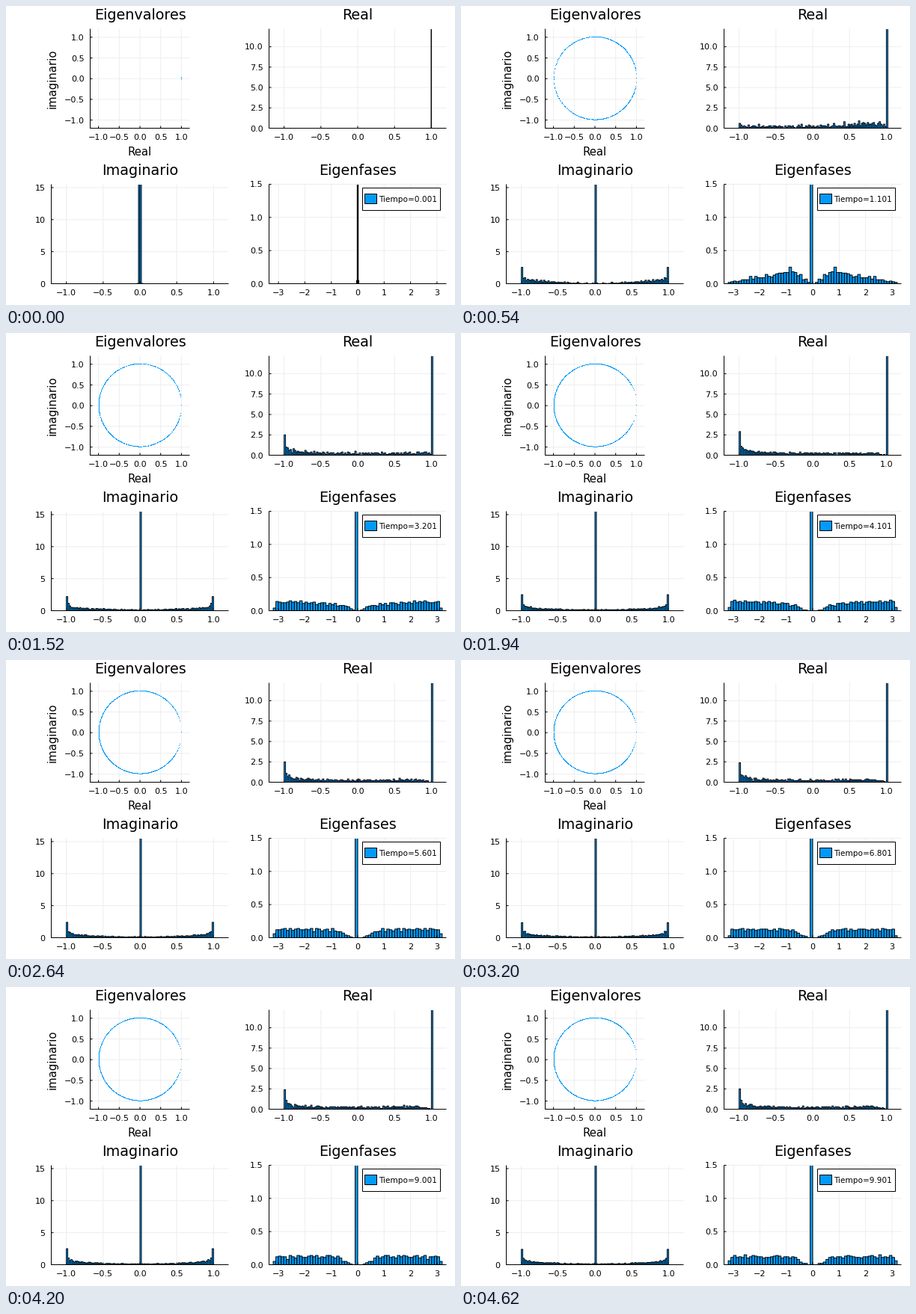
These frames come from a looping animation (600 by 400 pixels, 4640 ms). A matplotlib script:

```python
import numpy as np
import matplotlib.pyplot as plt
from matplotlib.animation import FuncAnimation
from matplotlib.collections import PolyCollection
from matplotlib.patches import Rectangle

W, H, DPI = 600, 400, 100
PX = 72 / DPI                       # points per pixel
BLUE = (0, 0.605, 0.979)
GRID = "#eeeeee"
TITLE, GUIDE, TICK, KEY = 19.1, 14.9, 11.1, 10.55   # text sizes in pixels
SIZE = 1000                         # all eigenvalues
PAIRS = 320                         # conjugate pairs away from 1
T0, DT = 0.001, 0.1

plt.rcParams["font.family"] = "DejaVu Sans"
fig = plt.figure(figsize=(W / DPI, H / DPI), dpi=DPI, facecolor="white")
ax = fig.add_axes([0, 0, 1, 1])
ax.set_xlim(0, W)
ax.set_ylim(H, 0)
ax.axis("off")


def text(x, y, s, size, ha="center", **kw):
    return ax.text(x, y, s, fontsize=size * PX, ha=ha, va="baseline", **kw)


def line(xs, ys, color="black", z=4):
    ax.plot(xs, ys, color=color, lw=PX, zorder=z, solid_capstyle="butt",
            snap=False)


def box(x, y, w, h, fill, z):
    ax.add_patch(Rectangle((x, y), w, h, fc=fill, ec="black", lw=PX,
                           zorder=z, snap=False))


class Panel:
    """Axes box in pixels, with linear scales anchored at the data origin."""

    def __init__(self, title, frame, origin, scale, xticks, yticks, xfmt, yfmt):
        self.left, self.top, self.right, self.bottom = frame
        self.x0, self.y0 = origin
        self.sx, self.sy = scale
        for v in xticks:
            x = self.x(v)
            line([x, x], [self.top, self.bottom], GRID, 0)
            line([x, x], [self.bottom, self.bottom - 3])
            text(x, self.bottom + 15.3, self.label(v, xfmt), TICK)
        for v in yticks:
            y = self.y(v)
            line([self.left, self.right], [y, y], GRID, 0)
            line([self.left, self.left + 3], [y, y])
            text(self.left - 8, y + 4, self.label(v, yfmt), TICK, "right")
        line([self.left, self.left], [self.top, self.bottom + 0.5])
        line([self.left, self.right], [self.bottom, self.bottom])
        text((self.left + self.right) / 2, self.top - 12.8, title, TITLE)

    @staticmethod
    def label(v, fmt):
        return format(v, fmt).replace("-", "\u2212")

    def x(self, v):
        return self.x0 + self.sx * np.asarray(v)

    def y(self, v):
        return self.y0 - self.sy * np.asarray(v)

    def add_bars(self, min_step=0):
        self.min_step = min_step
        self.bars = PolyCollection([], facecolor=BLUE, edgecolor="black",
                                   lw=0.95 * PX, zorder=2, snap=False)
        ax.add_collection(self.bars, autolim=False)
        clip = Rectangle((self.left, self.top), self.right - self.left,
                         self.bottom - self.top + 0.5,
                         transform=ax.transData)
        self.bars.set_clip_path(clip)

    def set_hist(self, values):
        edges, heights = density(values, self.min_step)
        x = self.x(edges)
        y = np.maximum(self.y(heights), self.top - 10)
        base = self.y0
        self.bars.set_verts([
            [(a, base), (a, h), (b, h), (b, base)]
            for a, b, h in zip(x[:-1], x[1:], y)])


def density(values, min_step, bins=100):
    """Normalised histogram on round bin widths of 1, 2 or 5."""
    raw = np.ptp(values) / bins
    unit = 10 ** np.floor(np.log10(raw))
    r = raw / unit
    step = unit * (1 if r <= 1.1 else 2 if r <= 2.2 else 5 if r <= 5.5 else 10)
    step = max(step, min_step)
    idx = np.floor(values / step + 1e-10).astype(int)
    lo = idx.min()
    counts = np.bincount(idx - lo)
    edges = (lo + np.arange(len(counts) + 1)) * step
    return edges, counts / (len(values) * step)


def make_levels():
    """Positive energies: a skewed bulk and a single far outlier."""
    rng = np.random.default_rng(11)
    knots = [0, 0.1, 0.3, 0.5, 0.8, 1.2, 1.6, 2.2, 2.6, 3.12]
    weight = [0, 0.01, 0.07, 0.14, 0.24, 0.17, 0.13, 0.10, 0.06, 0.035]
    grid = np.linspace(0, knots[-1], 800)
    cdf = np.cumsum(np.interp(grid, knots, weight))
    n = PAIRS - 1
    q = (np.arange(n) + 0.5 + rng.normal(0, 2, n)) / n
    bulk = np.interp(np.clip(q, 0.001, 1), cdf / cdf[-1], grid) / 1.101
    return np.append(bulk, 25)


LEVELS = make_levels()


def phases(t):
    """Phases folded to 0..pi; later they even out and shun zero."""
    a = np.abs((LEVELS * t + np.pi) % (2 * np.pi) - np.pi)
    late = np.clip((t - 2) / 2, 0, 1)
    if late > 0:
        rank = a.argsort().argsort()
        a += 0.55 * late * ((rank + 0.5) * np.pi / PAIRS - a)
        grid = np.linspace(0, np.pi, 600)
        cum = np.cumsum(1 - np.exp(-(grid / (0.57 * late)) ** 3))
        a = np.interp(a, cum / cum[-1] * np.pi, grid)
    return a


unit_ticks = [-1, -0.5, 0, 0.5, 1]
plane = Panel("Eigenvalores", (112.5, 30.5, 245.5, 163.5), (179, 97.2),
              (55.4, 55.4), unit_ticks, unit_ticks, ".1f", ".1f")
real = Panel("Real", (351.5, 30.5, 588.5, 163.5), (470, 163.5),
             (98.4, 10.9), unit_ticks, [0, 2.5, 5, 7.5, 10], ".1f", ".1f")
imag = Panel("Imaginario", (60.5, 238.5, 297.5, 371.5), (179, 371.5),
             (98.4, 8.57), unit_ticks, [0, 5, 10, 15], ".1f", ".0f")
phase = Panel("Eigenfases", (351.5, 238.5, 588.5, 371.5), (470, 371.5),
              (35.3, 88.67), range(-3, 4), [0, 0.5, 1, 1.5], ".0f", ".1f")
text(179, 199.5, "Real", GUIDE)
text(67, 97, "imaginario", GUIDE, rotation=90, rotation_mode="anchor")

real.add_bars()
imag.add_bars(0.02)
phase.add_bars(0.02)
dots, = ax.plot([], [], ",", color=BLUE, zorder=5)

# legend
box(476.5, 243.5, 104, 30, "white", 6)
box(479.5, 251.5, 16, 13, BLUE, 7)
clock = text(498, 262.5, "", KEY, "left", zorder=7)


def step_at(tick):
    """Every third step is held for five ticks, the others for one."""
    cycle, pos = divmod(tick, 7)
    return 3 * cycle + (0 if pos == 0 else 2 if pos == 6 else 1)


def update(tick):
    t = T0 + DT * step_at(tick)
    a = phases(t)
    zeros = np.zeros(SIZE - 2 * PAIRS)
    angles = np.concatenate([-a, zeros, a])
    re, im = np.cos(angles), np.sin(angles)
    dots.set_data(plane.x(re), plane.y(im))
    real.set_hist(re)
    imag.set_hist(im)
    phase.set_hist(np.concatenate([-a, zeros - 1e-8, a]))
    clock.set_text(f"Tiempo={t:.3f}")
    return dots, real.bars, imag.bars, phase.bars, clock


anim = FuncAnimation(fig, update, frames=232, interval=20, repeat=True,
                     repeat_delay=0, cache_frame_data=False)
plt.show()
```
